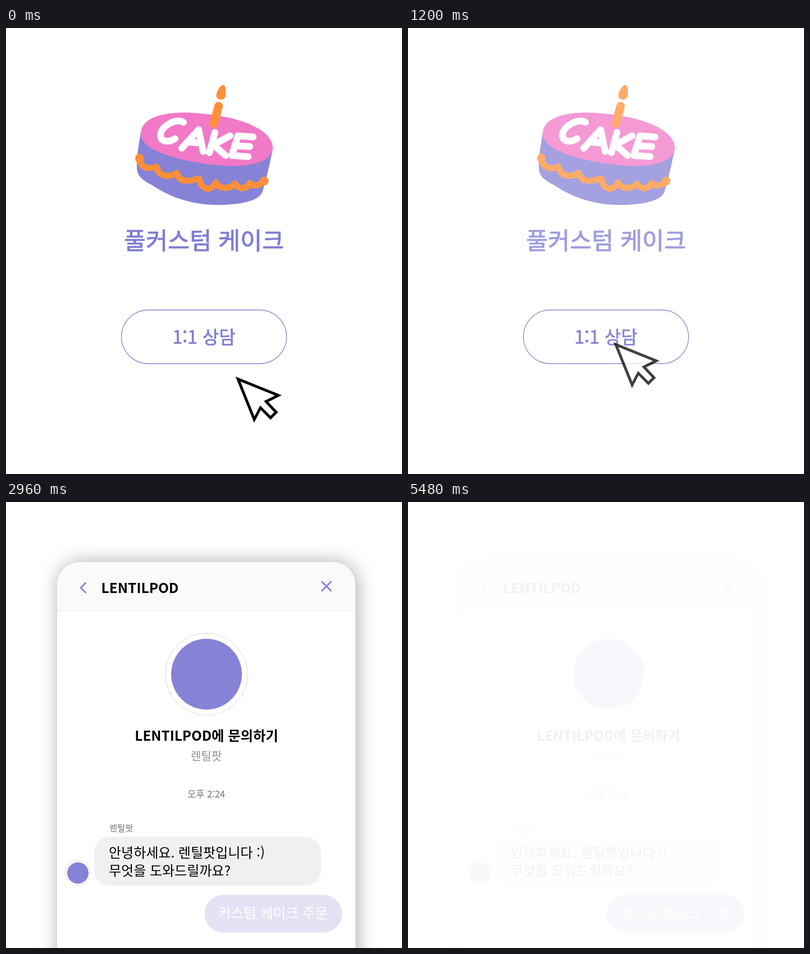
These frames come from a looping animation (705 by 794 pixels, 6 s). An HTML page:

```html
<!DOCTYPE html>
<html lang="ko">
<head>
<meta charset="utf-8">
<style>
  html, body { margin: 0; width: 100%; height: 100%; overflow: hidden; background: #fff; }
  svg { display: block; width: 705px; height: 794px; font-family: "Noto Sans CJK KR", "Noto Sans CJK", sans-serif; }
  .mid { text-anchor: middle; }
  .line { fill: none; stroke-linecap: round; stroke-linejoin: round; }
  .grey { fill: #8e8e8e; }
  /* Medium weight: regular text thickened by a thin outline */
  .medium { stroke: currentColor; fill: currentColor; stroke-width: 0.022em; stroke-linejoin: round; }
  .medium.grey { color: #8e8e8e; }
  .panel { filter: drop-shadow(3px 1px 17px #0005); }
</style>
</head>
<body>
<svg viewBox="0 0 705 794">
  <g id="cake">
    <path fill="#8682d6" d="M240 185 C237 205 232 230 233 250 C234 267 247 272 262 281 C295 303 335 315 376 315 C415 315 448 309 456 293 C463 272 470 240 475 215 Z"/>
    <path fill="#f279c7" d="M240 186 C243 153 300 146 355 153 C425 160 477 184 475 215 C470 241 430 248 385 245 C300 238 236 215 240 186 Z"/>
    <path class="line" stroke="#ff8f38" stroke-width="11" d="M238 232 C239 252 258 251 268 247 C272 266 290 266 304 258 C308 276 326 273 344 268 C347 290 366 291 374 275 C380 288 398 287 408 277 C413 288 428 288 434 276 C440 283 452 281 460 272"/>
    <path class="line" stroke="#ff8f38" stroke-width="15" d="M378.5 139 L370 170 M237.5 231 v2 M459 273 l1 -1"/>
    <path fill="#ff8f38" d="M387 101 C392 104 392 112 391 120 C390 126 386 128 382 127.500 C376 127 373 122 375 116 C377 110 381 103 387 101 Z"/>
    <path class="line" stroke="#fff" stroke-width="12" d="M316 168 C306 160 278 172 275 189 C274 204 290 204 301 197
      M313 214 L343 181 L351 220 M326 203 L348 205
      M372 186 L362 222 M399 192 L369 208 L391 227
      M440 194 L413 192 L402 227 L431 229 M409 210 L434 211"/>
    <text class="mid medium" x="352.500" y="394" font-size="42.400" color="#7f7bd4">풀커스텀 케이크</text>
  </g>
  <g id="button">
    <rect id="fill" x="205.500" y="502" width="294" height="95.500" rx="47.750" fill="#8682d6"/>
    <rect x="205.500" y="502" width="294" height="95.500" rx="47.750" fill="none" stroke="#8682d6" stroke-width="1.300"/>
    <text id="label" class="mid medium" x="352.500" y="562" font-size="32">1:1 상담</text>
  </g>
  <circle id="ring" cx="367" cy="560" fill="none" stroke="#8682d6"/>
  <path id="cursor" fill="#fff" stroke="#000" stroke-width="4.800" d="M413 625 L485 654 L463 665 L481 684 L471 694 L453 676 L442 697 Z"/>

  <g id="chat">
    <g class="panel">
      <rect x="91" y="107" width="531" height="760" rx="40" fill="#fff"/>
    </g>
    <path fill="#fafafa" d="M91 194 V147 a40 40 0 0 1 40 -40 H582 a40 40 0 0 1 40 40 V194 Z"/>
    <path stroke="#e6e6e6" d="M91 194 H622"/>
    <path class="line" stroke="#8682d6" stroke-width="2.800" d="M141.500 144 L133 152.500 L141.500 161 M562.500 142 L578.500 158 M578.500 142 L562.500 158"/>
    <text x="169.500" y="162" font-size="24.500" font-weight="700">LENTILPOD</text>
    <circle cx="357" cy="306.500" r="73" fill="#fff" stroke="#ddd"/>
    <circle cx="357" cy="306.500" r="63" fill="#8682d6"/>
    <text class="mid" x="357" y="424.500" font-size="24.300" font-weight="700">LENTILPOD에 문의하기</text>
    <text class="mid grey" x="356.500" y="460" font-size="20">렌틸팟</text>
    <text class="mid grey medium" x="356.500" y="525.500" font-size="16.500">오후 2:24</text>
    <g id="hello">
      <text class="grey medium" x="184" y="586" font-size="15.300">렌틸팟</text>
      <circle cx="128" cy="660.500" r="22" fill="#fff" stroke="#ddd"/>
      <circle cx="128" cy="660.500" r="19" fill="#8682d6"/>
      <rect x="157" y="596" width="404" height="87" rx="28" fill="#f0f0f0"/>
      <g font-size="24">
        <text x="183" y="632.500">안녕하세요. 렌틸팟입니다 :)</text>
        <text x="183" y="664.500">무엇을 도와드릴까요?</text>
      </g>
    </g>
    <g id="reply">
      <rect x="353.500" y="699.500" width="245" height="67" rx="33.500" fill="#8682d6"/>
      <text class="mid" x="475.500" y="740.500" font-size="24.700" fill="#fff">커스텀 케이크 주문</text>
    </g>
  </g>
</svg>
<script>
const LOOP = 6000, STEP = 40;
const el = id => document.getElementById(id);
const set = (id, attrs) => {
  for (const k in attrs) el(id).setAttribute(k, attrs[k]);
};
const fade = (id, opacity) => set(id, { opacity });
const ramp = (t, from, to) => Math.min(1, Math.max(0, (t - from) / (to - from)));
const ease = p => p * p * (3 - 2 * p);
const mix = (a, b, p) => Math.round(a + (b - a) * p);

function draw(t) {
  // Pointer travels to the button and clicks
  const move = ease(ramp(t, 280, 680));
  set("cursor", { transform: `translate(${-43 * move} ${-61.5 * move})` });
  const press = ramp(t, 640, 880) * (1 - ramp(t, 960, 1160));
  fade("fill", press);
  set("label", { color: `rgb(${mix(127, 255, press)}, ${mix(123, 255, press)}, ${mix(212, 255, press)})` });
  const grow = ramp(t, 660, 800);
  set("ring", { r: 35.5 * grow, "stroke-width": 15 * grow, opacity: 1 - ramp(t, 860, 1040) });

  // First screen leaves, the button a little later
  const gone = ramp(t, 1120, 1440);
  fade("cake", 1 - gone);
  fade("cursor", 1 - gone);
  fade("button", 1 - gone * gone);

  // Chat builds up, then fades to a faint trace
  fade("chat", ramp(t, 1320, 1680) * (1 - 0.95 * ramp(t, 4636, 5480)));
  fade("hello", ramp(t, 1880, 2160));
  fade("reply", ramp(t, 2880, 3240));
}

const start = performance.now();
function tick() {
  const t = (performance.now() - start) % LOOP;
  draw(Math.floor(t / STEP) * STEP);
  requestAnimationFrame(tick);
}
tick();
</script>
</body>
</html>
```
